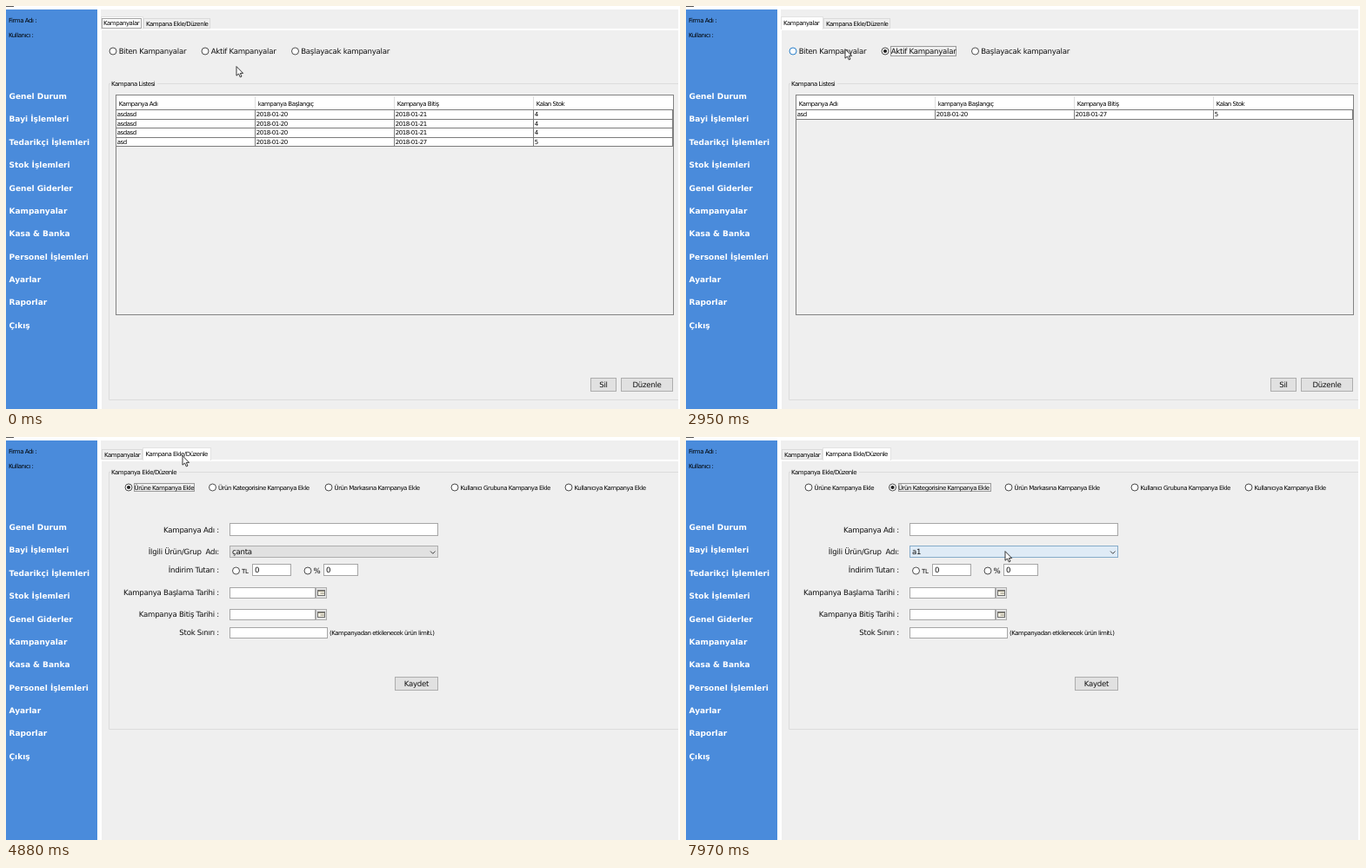
These frames come from a looping animation (775 by 464 pixels, 8 s). An HTML page:

```html
<!DOCTYPE html>
<html lang="tr">
<head>
<meta charset="utf-8">
<title>Kampanyalar</title>
<style>
  html, body { margin: 0; width: 100%; height: 100%; overflow: hidden; background: #fff; }
  svg { display: block; width: 775px; height: 464px; }
  text { font: 8.6px "DejaVu Sans", sans-serif; letter-spacing: -.03em; fill: #111; text-rendering: geometricPrecision; white-space: pre; }
  .small { font-size: 7px; letter-spacing: -.47px; fill: #000; }
  .menu { font-size: 9px; font-weight: bold; letter-spacing: 0; fill: #fff; }
  .focus { fill: none; stroke: #444; stroke-width: 1; stroke-dasharray: 1 1; }
</style>
</head>
<body>
<svg id="stage" viewBox="0 0 775 464"></svg>
<script>
const LOOP = 8000;
const BG = '#efefef', BLUE = '#1673c4';
const stage = document.getElementById('stage');

function add(parent, tag, attrs = {}, content) {
  const el = document.createElementNS('http://www.w3.org/2000/svg', tag);
  for (const key in attrs) el.setAttribute(key, attrs[key]);
  if (content !== undefined) el.textContent = content;
  return parent.appendChild(el);
}
const group = parent => add(parent, 'g');
const fillBox = (p, x, y, width, height, fill) => add(p, 'rect', { x, y, width, height, fill });
const box = (p, x, y, width, height, fill, stroke) =>
  add(p, 'rect', { x: x + .5, y: y + .5, width: width - 1, height: height - 1, fill, stroke });
const line = (p, d, stroke, width = 1) => add(p, 'path', { d, stroke, fill: 'none', 'stroke-width': width });
// y is the middle of the capitals
const label = (p, x, y, str, anchor = 'start') => add(p, 'text', { x, y: y + 3.1, 'text-anchor': anchor }, str);
const small = (p, x, y, str) => add(p, 'text', { x, y: y + 2.6, class: 'small' }, str);
const show = (el, on) => { el.style.display = on ? '' : 'none'; };

// value of the last step that has begun
function at(track, t) {
  let value = track[0][1];
  for (const [time, next] of track) if (t >= time) value = next;
  return value;
}

function button(p, x, y, w, h, str) {
  box(p, x, y, w, h, '#e1e1e1', '#adadad');
  label(p, x + w / 2, y + h / 2, str, 'middle');
}

function fieldset(p, y, bottom, title, titleWidth) {
  line(p, `M773 ${y + .5}H118.5V${bottom + .5}H773`, '#dcdcdc');
  fillBox(p, 120, y - 2, titleWidth, 5, BG);
  small(p, 121, y, title);
}

const looks = {
  off: ['#3c3c3c', '#fff', 'none'],
  hover: [BLUE, '#fff', 'none'],
  press: ['#35597c', '#d5e5f3', '#3b6c9c'],
  hot: [BLUE, '#fff', BLUE],
  on: ['#3c3c3c', '#fff', '#222'],
  fade: ['#555', '#e2e2e2', '#888']
};

function radio(p, x, y, track) {
  const ring = add(p, 'circle', { cx: x, cy: y, r: 4, 'stroke-width': .9 });
  const dot = add(p, 'circle', { cx: x, cy: y, r: 2.1 });
  return t => {
    const [stroke, fill, center] = looks[at(track, t)];
    ring.setAttribute('stroke', stroke);
    ring.setAttribute('fill', fill);
    dot.setAttribute('fill', center);
  };
}

function focusRing(p, x, y, w, h, from, to) {
  const el = add(p, 'rect', { x: x + .5, y: y + .5, width: w, height: h, class: 'focus' });
  return t => show(el, t >= from && t < to);
}

const updates = [];

// frame and side menu
fillBox(stage, 0, 0, 775, 464, '#fff');
fillBox(stage, 0, 0, 9, 1, '#555');
fillBox(stage, 0, 4, 105, 460, '#4a8bdb');
fillBox(stage, 109, 4, 664, 22, BG);
fillBox(stage, 110, 28, 663, 436, BG);
small(stage, 3, 16, 'Firma Adı :');
small(stage, 3, 33, 'Kullanıcı :');
['Genel Durum', 'Bayi İşlemleri', 'Tedarikçi İşlemleri', 'Stok İşlemleri', 'Genel Giderler', 'Kampanyalar',
  'Kasa & Banka', 'Personel İşlemleri', 'Ayarlar', 'Raporlar', 'Çıkış'].forEach((str, i) =>
  label(stage, 3.5, 104 + 26.35 * i, str).setAttribute('class', 'menu'));

const listPage = group(stage), formPage = group(stage);

// list page: tabs
const otherTab = box(listPage, 158, 14, 77, 12, BG, '#dadada');
box(listPage, 109, 12, 49, 15, '#fff', '#e2e2e2');
fillBox(listPage, 110, 25, 47, 3, '#fff');
updates.push(focusRing(listPage, 110, 14, 45, 11, 0, 1000));
small(listPage, 112, 19.5, 'Kampanyalar');
small(listPage, 161, 20, 'Kampana Ekle/Düzenle');
updates.push(t => otherTab.setAttribute('fill', t >= 4570 ? '#d8e8f4' : BG));

// list page: filters
const filters = [
  [123, 'Biten Kampanyalar', [[0, 'off'], [2710, 'hover'], [3270, 'press'], [4420, 'on']]],
  [229, 'Aktif Kampanyalar', [[0, 'off'], [220, 'hover'], [370, 'off'], [1700, 'hover'], [1850, 'press'],
    [2400, 'on'], [3420, 'fade'], [3570, 'off']]],
  [332.5, 'Başlayacak kampanyalar', [[0, 'off'], [690, 'hover'], [1000, 'press'], [1080, 'hot'], [1630, 'on'],
    [2080, 'fade'], [2400, 'off']]]
];
for (const [x, str, track] of filters) {
  updates.push(radio(listPage, x, 52, track));
  label(listPage, x + 6.7, 52, str);
}
updates.push(
  focusRing(listPage, 129, 46, 79, 11, 3270, LOOP),
  focusRing(listPage, 235, 46, 75, 11, 1850, 3270),
  focusRing(listPage, 338, 46, 103, 11, 1000, 1850));

// list page: table
fieldset(listPage, 89, 453, 'Kampana Listesi', 54);
fillBox(listPage, 127, 103, 641, 17, '#fff');
const columns = [126.5, 286.5, 446.5, 606.5];
['Kampanya Adı', 'kampanya Başlangıç', 'Kampanya Bitiş', 'Kalan Stok'].forEach((str, i) => {
  if (i) line(listPage, `M${columns[i]} 104V119`, '#dedede');
  small(listPage, columns[i] + 3.2, 112, str);
});
const ended = ['asdasd', '2018-01-20', '2018-01-21', '4'];
const active = ['asd', '2018-01-20', '2018-01-27', '5'];
const rowLine = r => Math.floor(119.5 + 10.6 * r) + .5;

function rows(data, from, to) {
  const g = group(listPage), top = rowLine(0), bottom = rowLine(data.length);
  fillBox(g, 127, top, 640, bottom - top, '#fff');
  for (let r = 0; r <= data.length; r++) line(g, `M127 ${rowLine(r)}H767`, '#7c7c7c');
  for (const x of [...columns.slice(1), 766.5]) line(g, `M${x} ${top}V${bottom}`, '#7c7c7c');
  data.forEach((cells, r) => cells.forEach((str, i) =>
    small(g, columns[i] + 1.2, (rowLine(r) + rowLine(r + 1)) / 2 - .2, str)));
  updates.push(t => show(g, t >= from && t < to));
}
rows([ended, ended, ended, active], 0, 1080);
rows([active], 2080, 3500);
rows([ended, ended, ended], 3500, LOOP);
box(listPage, 126, 102, 642, 254, 'none', '#828282');
button(listPage, 672, 428, 30, 16, 'Sil');
button(listPage, 707, 428, 60, 16, 'Düzenle');

// form page
box(formPage, 110, 14, 47, 12, BG, '#dadada');
box(formPage, 157, 12, 79, 15, '#fff', '#e2e2e2');
fillBox(formPage, 158, 25, 77, 3, '#fff');
small(formPage, 113, 20, 'Kampanyalar');
small(formPage, 160.5, 19, 'Kampana Ekle/Düzenle');
fieldset(formPage, 40, 336, 'Kampanya Ekle/Düzenle', 79);
const still = [[0, 'off']];
const kinds = [
  [141, 'Ürüne Kampanya Ekle', [[0, 'on'], [6740, 'fade'], [6980, 'off']]],
  [237.5, 'Ürün Kategorisine Kampanya Ekle', [[0, 'off'], [5970, 'hover'], [6660, 'press'], [6740, 'hot'], [7510, 'on']]],
  [371, 'Ürün Markasına Kampanya Ekle', still],
  [516, 'Kullanıcı Grubuna Kampanya Ekle', still],
  [647, 'Kullanıcıya Kampanya Ekle', still]
];
for (const [x, str, track] of kinds) {
  updates.push(radio(formPage, x, 58, track));
  small(formPage, x + 6.5, 58, str);
}
updates.push(
  focusRing(formPage, 147, 53, 69, 9, 0, 6660),
  focusRing(formPage, 244, 53, 106, 9, 6660, LOOP));

[['Kampanya Adı :', 107], ['İlgili Ürün/Grup  Adı:', 132], ['İndirim Tutarı :', 153],
  ['Kampanya Başlama Tarihi :', 179], ['Kampanya Bitiş Tarihi :', 204], ['Stok Sınırı :', 225]]
  .forEach(([str, y]) => label(formPage, 245, y, str, 'end'));

const field = (x, y, w, h = 14) => box(formPage, x, y, w, h, '#fff', '#a6a6a6');
field(257, 99, 240, 15);
const combo = box(formPage, 257, 125, 240, 14, '#e1e1e1', '#adadad');
const choice = label(formPage, 260, 132, '');
line(formPage, 'M488 131.5L490.8 134.3L493.6 131.5', '#444');
updates.push(t => {
  choice.textContent = t < 6820 ? 'çanta' : 'a1';
  combo.setAttribute('fill', t < 7660 ? '#e1e1e1' : '#dfebf6');
  combo.setAttribute('stroke', t < 7660 ? '#adadad' : '#86abc9');
});

for (const [x, w, unit] of [[264.5, 45, 'TL'], [347, 40, '%']]) {
  const left = unit === 'TL' ? 283 : 365;
  updates.push(radio(formPage, x, 154, still));
  (unit === 'TL' ? small : label)(formPage, x + 6.6, 154, unit);
  field(left, 146, w);
  label(formPage, left + 3, 153, '0');
}
for (const y of [173, 198]) {
  field(257, y, 99, 13);
  box(formPage, 356, y, 13, 13, '#e4e4e4', '#adadad');
  box(formPage, 358, y + 3, 9, 7, '#f7f3e4', '#6d6d6d');
  line(formPage, `M359 ${y + 4.5}H366M361.5 ${y + 7}H366`, '#8d8878');
}
field(257, 219, 113, 13);
small(formPage, 372, 225.5, '(Kampanyadan etkilenecek ürün limiti.)');
button(formPage, 447, 276, 50, 16, 'Kaydet');
updates.push(t => {
  show(listPage, t < 4880);
  show(formPage, t >= 4880);
});

// pointer: start, end, number of steps, target x, target y
const moves = [
  [70, 440, 6, 353, 43], [610, 850, 4, 357, 55], [1550, 1700, 3, 291, 57], [1850, 1930, 2, 289, 55],
  [2320, 2400, 2, 243, 54], [2550, 2790, 4, 181, 51], [2950, 2950, 1, 183, 50], [4340, 4650, 5, 203, 22],
  [5430, 5430, 1, 202, 20], [5580, 5580, 1, 207, 26], [5730, 5890, 3, 248, 47], [5970, 6210, 4, 267, 56],
  [6820, 7430, 8, 399, 112], [7510, 7970, 7, 367, 132]
];
const pointer = add(stage, 'path', {
  d: 'M0 0V10.6L2.5 8.4L4.3 12.3L6 11.5L4.3 7.8H7.6Z', fill: '#fff', stroke: '#222', 'stroke-width': .9
});
updates.push(t => {
  let x = 265, y = 70;
  for (const [start, end, steps, toX, toY] of moves) {
    if (t < start) break;
    const gap = (end - start) / Math.max(1, steps - 1);
    const done = gap ? Math.min(steps, Math.floor((t - start) / gap + .001) + 1) : 1;
    x += (toX - x) * done / steps;
    y += (toY - y) * done / steps;
  }
  pointer.setAttribute('transform', `translate(${x} ${y - .4})`);
});

const begin = performance.now();
function frame() {
  const t = (performance.now() - begin) % LOOP;
  updates.forEach(update => update(t));
  requestAnimationFrame(frame);
}
frame();
</script>
</body>
</html>
```
